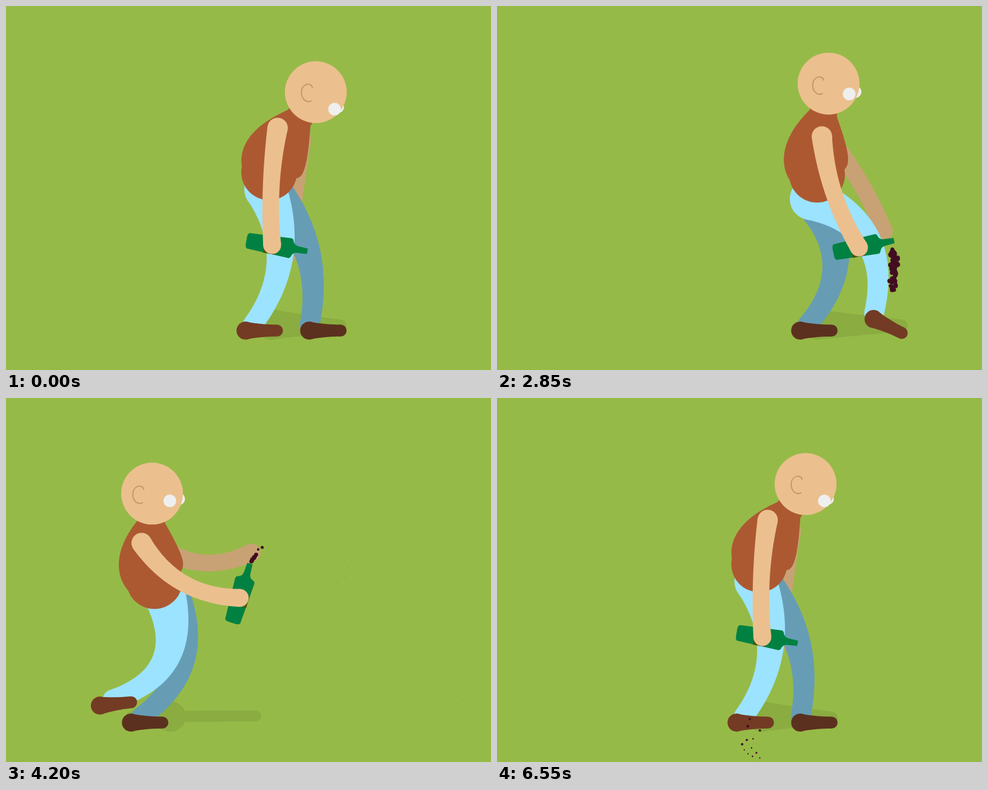
Animation, 800 px wide and 600 px high, one loop 6600 ms. Source, as an HTML page with a canvas:

```html
<!DOCTYPE html>
<html lang="en">
<head>
<meta charset="utf-8">
<title>Stagger</title>
<style>
html, body { margin: 0; width: 100%; height: 100%; overflow: hidden; background: #96ba47; }
canvas { display: block; }
</style>
</head>
<body>
<canvas id="stage" width="800" height="600"></canvas>
<script>
const ctx = document.getElementById('stage').getContext('2d');
const LOOP = 6600, GROUND = 535, GRAVITY = 900, TAU = Math.PI * 2;

// time, head, torso base, hip
const BODY = [
  [0, 511, 142, 434, 274, 428, 302],
  [1700, 694, 186, 582, 281, 556, 315],
  [2850, 547, 128, 528, 278, 518, 318],
  [3750, 307, 140, 343, 288, 362, 305],
  [4700, 195, 174, 158, 315, 168, 345],
  [5550, 309, 140, 282, 292, 275, 325]
];
// near shoulder, hand, bend, far hand, bend, bottle angle
const ARMS = [
  [448, 201, 439, 394, -6, 463, 410, 1, 10],
  [616, 237, 555, 420, -9, 697, 417, -32, 22],
  [536, 215, 597, 398, -11, 638, 371, 8, -11],
  [319, 221, 509, 204, -18, 505, 200, -9, -97],
  [145, 257, 188, 432, -29, 301, 328, -40, -35],
  [295, 227, 305, 419, -7, 232, 391, -18, 11]
];
// knee bends, eye offset, far eye distance
const TILT = [
  [34, 30, 31, 28, 3], [36, 30, 7, 30, 19], [41, 39, 34, 17, 9],
  [44, 26, 38, 5, 7], [30, 62, 20, 20, 22], [28, 34, 33, 5, 15]
];
// start, end, landing x, lift
const NEAR_STEPS = [[1000, 1722, 628, 50], [2795, 3395, 345, 66], [3800, 4450, 62, 30], [4800, 5575, 395, 60]];
const FAR_STEPS = [[3250, 3850, 206, 12], [5700, 6540, 500, 55]];
// time, count, x, y, half width, half height, radius, age
const SPILLS = [
  [1700, 65, 572, 488, 19, 38, 5, 0.15],
  [1700, 20, 572, 548, 28, 42, 2.3, 0.4],
  [1700, 16, 500, 468, 22, 24, 4.2, 0.3],
  [2850, 60, 654, 434, 8, 34, 5.5, 0.12],
  [3750, 12, 550, 153, 9, 22, 5, 0.15],
  [3750, 20, 653, 320, 24, 58, 3.5, 0.4],
  [3750, 24, 652, 512, 26, 46, 1.6, 0.6],
  [4700, 54, 425, 266, 54, 50, 3.9, 0.4],
  [4700, 5, 243, 406, 3, 8, 6.3, 0.05],
  [5550, 65, 246, 534, 22, 32, 7, 0.35],
  [5550, 4, 327, 461, 4, 7, 5.7, 0.18],
  [6550, 13, 418, 562, 22, 40, 2.4, 0.5]
];

const mix = (a, b, u) => a + (b - a) * u;
const lerp = (a, b, u) => [mix(a[0], b[0], u), mix(a[1], b[1], u)];
const polar = (p, angle, r) => [p[0] + Math.cos(angle) * r, p[1] + Math.sin(angle) * r];

function spine(p) {
  const head = [p[0], p[1]], base = [p[2], p[3]], mid = lerp(base, head, 0.28);
  mid[0] -= 6;
  const neck = lerp(head, mid, 0.45);
  return { head, base, mid, neck, farShoulder: [neck[0] + 3, neck[1] + 34] };
}

// Hands become angle and reach, so arms keep their length while swinging.
function toReach(p, from, i) {
  const dx = p[i] - from[0], dy = p[i + 1] - from[1];
  p[i] = Math.atan2(dy, dx);
  p[i + 1] = Math.hypot(dx, dy);
}

const POSES = BODY.map(([t, ...body], i) => {
  const v = [...body, ...ARMS[i], ...TILT[i]];
  toReach(v, [v[6], v[7]], 8);
  toReach(v, spine(v).farShoulder, 11);
  return { t, v };
});

function key(i) {
  const n = POSES.length, turn = Math.floor(i / n), k = POSES[i - turn * n];
  return { t: k.t + turn * LOOP, v: k.v };
}

function poseAt(t) {
  let i = POSES.length - 1;
  while (POSES[i].t > t) i--;
  const [a, b, c, d] = [key(i - 1), key(i), key(i + 1), key(i + 2)];
  const span = c.t - b.t, u = (t - b.t) / span, w = 1 - u;
  const ease = j => j % POSES.length ? 0.6 : 0.15;
  return b.v.map((v, k) => {
    const m0 = ease(i) * span * (c.v[k] - a.v[k]) / (c.t - a.t);
    const m1 = ease(i + 1) * span * (d.v[k] - v) / (d.t - b.t);
    return v * (1 + 2 * u) * w * w + m0 * u * w * w + c.v[k] * u * u * (3 - 2 * u) - m1 * u * u * w;
  });
}

function footAt(steps, t) {
  let x = steps[steps.length - 1][2], angle = 0, lift = 0;
  for (const [s, e, to, h] of steps) {
    if (t < s) break;
    const u = Math.min(1, (t - s) / (e - s));
    x = mix(x, to, u * u * (3 - 2 * u));
    lift = h * Math.sin(Math.PI * u);
    angle = h / 72 * Math.sin(TAU * u) * (1 - u);
  }
  const heel = [x, GROUND - lift];
  return { heel, lift, toe: polar(heel, angle, 52) };
}

function circle([x, y], r, color) {
  ctx.fillStyle = color;
  ctx.beginPath();
  ctx.arc(x, y, r, 0, TAU);
  ctx.fill();
}

// Bent, tapered tube through three points with a radius at each.
function tube(a, m, b, [r0, r1, r2], color) {
  const c = lerp(lerp(a, b, 0.5), m, 2), left = [], right = [], n = 32;
  for (let i = 0; i <= n; i++) {
    const u = i / n, w = 1 - u;
    const p = lerp(a, c, u), q = lerp(c, b, u), [x, y] = lerp(p, q, u);
    const dx = q[0] - p[0], dy = q[1] - p[1], len = Math.hypot(dx, dy) || 1;
    const r = r0 * w * (1 - 2 * u) + 4 * r1 * u * w + r2 * u * (2 * u - 1);
    left.push([x + dy / len * r, y - dx / len * r]);
    right.unshift([x - dy / len * r, y + dx / len * r]);
  }
  ctx.fillStyle = color;
  ctx.beginPath();
  for (const p of left.concat(right)) ctx.lineTo(p[0], p[1]);
  ctx.fill();
  circle(a, r0, color);
  circle(b, r2, color);
}

function bent(a, b, bend, radii, color) {
  const dx = b[0] - a[0], dy = b[1] - a[1], len = Math.hypot(dx, dy) || 1;
  const m = lerp(a, b, 0.5);
  tube(a, [m[0] + dy / len * bend, m[1] - dx / len * bend], b, radii, color);
}

const arm = (a, b, bend, color) => bent(a, b, bend, [16.8, 13.8, 14.8], color);

function leg(hip, foot, bend, cloth, shoe) {
  const [x, y] = foot.heel, knee = (hip[0] + x) / 2 + bend;
  const ankle = [x + 1 + Math.max(0, 0.22 * (knee - x)), y - 10];
  bent(hip, ankle, bend + foot.lift * 0.4, [35, 21.5, 16.3], cloth);
  bent(foot.heel, foot.toe, 0, [14.8, 11, 9.8], shoe);
}

function bottle(hand, angle) {
  ctx.save();
  ctx.translate(hand[0], hand[1]);
  ctx.rotate(angle);
  ctx.fillStyle = '#008142';
  for (const side of [-1, 1]) {
    ctx.beginPath();
    ctx.moveTo(-43, side * -0.5);
    ctx.quadraticCurveTo(-44, side * 12, -40, side * 13);
    ctx.lineTo(29, side * 16.5);
    ctx.quadraticCurveTo(33, side * 16.5, 34, side * 12);
    ctx.quadraticCurveTo(36, side * 6, 43, side * 5.5);
    ctx.lineTo(59, side * 4.5);
    ctx.lineTo(59, side * -0.5);
    ctx.fill();
  }
  ctx.fillStyle = '#4f5414';
  ctx.fillRect(-13, 4, 20, 11);
  ctx.restore();
}

function ear([x, y]) {
  ctx.strokeStyle = '#c2965f';
  ctx.lineWidth = 1.8;
  ctx.lineCap = 'round';
  ctx.beginPath();
  ctx.moveTo(x + 8, y - 9);
  ctx.bezierCurveTo(x + 7, y - 18, x - 11, y - 17, x - 10, y + 1);
  ctx.bezierCurveTo(x - 9, y + 9, x - 3, y + 17, x + 6, y + 13);
  ctx.stroke();
}

const nearHand = p => polar([p[6], p[7]], p[8], p[9]);
const bottleAngle = p => p[14] * TAU / 360;

function mouthAt(t) {
  const p = poseAt(t);
  return polar(nearHand(p), bottleAngle(p), 59);
}

let seed = 71;
function rnd() {
  seed = (seed * 16807) % 2147483647;
  return seed / 2147483647;
}

// Every drop leaves the bottle mouth and falls through its place in the spill.
const drops = [];
for (const [t, n, x, y, w, h, size, age] of SPILLS) {
  for (let i = 0; i < n; i++) {
    const v = rnd(), T = age * (0.8 + 0.6 * v);
    const px = x + (rnd() + rnd() - 1) * w, py = y + (2 * v - 1) * h;
    const from = mouthAt(t - T * 1000);
    drops.push({
      t, T, from, vx: (px - from[0]) / T, vy: (py - from[1]) / T - GRAVITY * T / 2,
      r: size * (1 - 0.25 * v) * (0.55 + 0.45 * rnd())
    });
  }
}

function drawDrops(t) {
  for (const d of drops) {
    const late = (t - d.t) / 1000, age = late + d.T;
    const r = d.r * Math.min(1.2, 1 - 2 * late);
    if (age < 0 || r <= 0) continue;
    circle([d.from[0] + d.vx * age, d.from[1] + d.vy * age + GRAVITY * age * age / 2], r, '#420d21');
  }
}

function shadow(x, feet, hands) {
  const from = [x, 525], color = '#8aac41';
  for (const f of feet) bent(from, [f.toe[0], 527], 0, [25, 17, 10], color);
  for (const h of hands) bent(from, [h[0] + 7, 524], 0, [9, 9, 9], color);
}

function draw(t) {
  const p = poseAt(t), { head, base, mid, neck, farShoulder } = spine(p);
  const hip = [p[4], p[5]], shoulder = [p[6], p[7]];
  const hand = nearHand(p), farHand = polar(farShoulder, p[11], p[12]);
  const near = footAt(NEAR_STEPS, t), far = footAt(FAR_STEPS, t);
  const eye = [head[0] + p[17], head[1] + p[18]];
  const pitch = Math.atan2(p[18], p[17]) - 0.2;

  ctx.fillStyle = '#96ba47';
  ctx.fillRect(0, 0, 800, 600);
  shadow(hip[0] + 10, [near, far], [hand, farHand]);

  arm(farShoulder, farHand, p[13], '#c8a274');
  leg([hip[0] + 8, hip[1] + 4], far, p[16], '#669db5', '#5c301e');
  leg(hip, near, p[15], '#9ce3ff', '#733b24');
  tube(base, mid, neck, [46, 51, 23], '#ac5932');

  circle(polar(polar(eye, pitch, p[19]), pitch - TAU / 4, 6), 10, '#efefef');
  circle(head, 51, '#ebc08e');
  ear(polar(eye, pitch, -52));
  circle(eye, 10.5, '#efefef');

  bottle(hand, bottleAngle(p));
  arm(shoulder, hand, p[10], '#ebc08e');
  drawDrops(t);
}

const start = performance.now();
function tick() {
  draw((performance.now() - start) % LOOP);
  requestAnimationFrame(tick);
}
tick();
</script>
</body>
</html>
```
